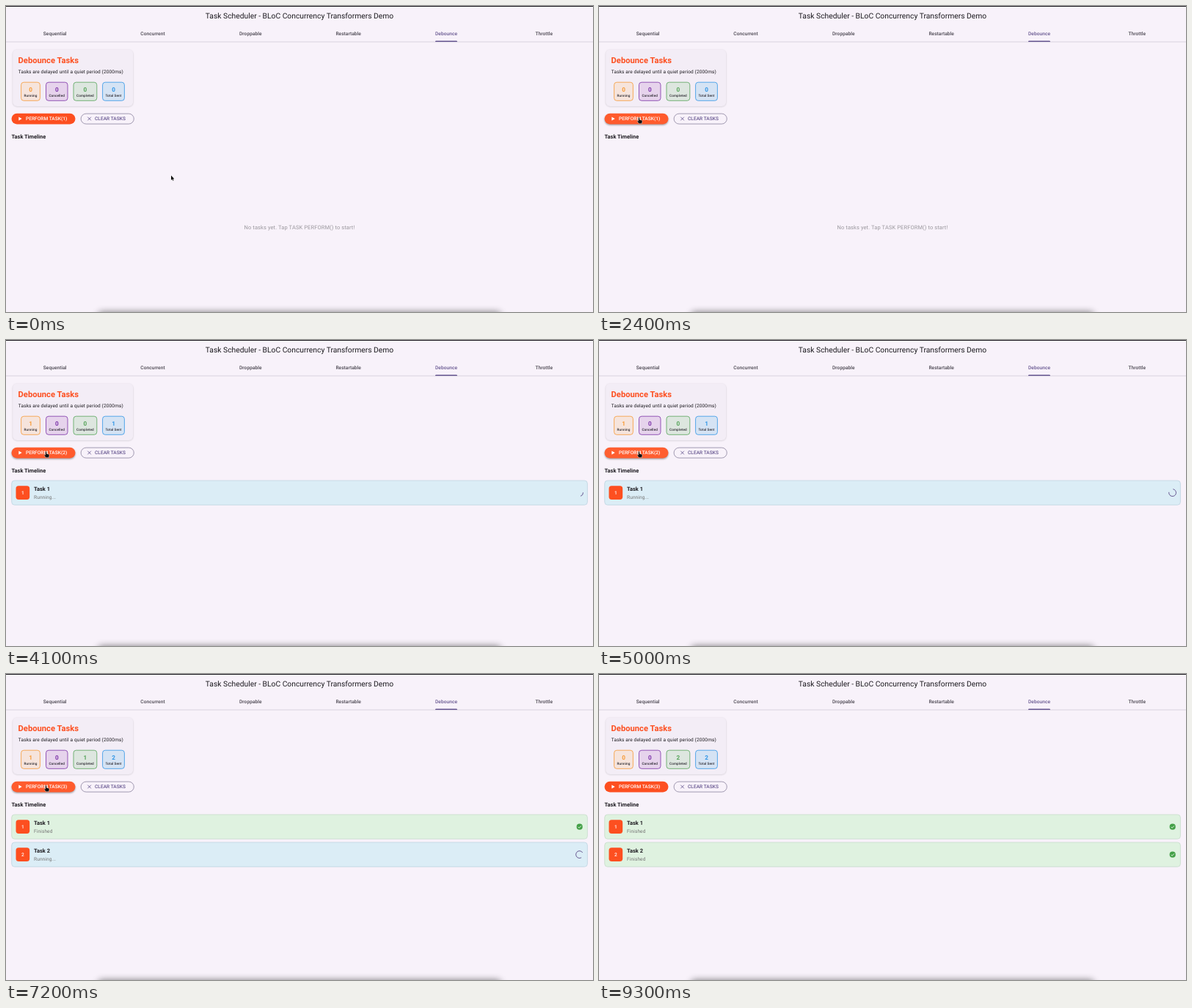
These frames come from a looping animation (800 by 418 pixels, 9400 ms). An HTML page:

```html
<!DOCTYPE html>
<html lang="en">
<head>
<meta charset="utf-8">
<title>Task Scheduler</title>
<style>
  html, body { margin: 0; width: 100%; height: 100%; overflow: hidden; background: #f8f2fa; }
  svg { display: block; font-family: Roboto, sans-serif; text-rendering: geometricPrecision; }
</style>
</head>
<body>
<svg id="stage" width="800" height="418" viewBox="0 0 800 418">
  <defs>
    <filter id="soft" x="-20%" y="-200%" width="140%" height="500%"><feGaussianBlur stdDeviation="1"/></filter>
    <filter id="dock" x="-20%" y="-200%" width="140%" height="500%"><feGaussianBlur stdDeviation="5"/></filter>
    <clipPath id="buttonClip"><rect x="7.5" y="146.8" width="87" height="14.6" rx="7.3"/></clipPath>
  </defs>
  <g id="fixed"></g>
  <g id="live"></g>
</svg>
<script>
const LOOP = 9400, STEP = 100;
const ORANGE = '#fd4f20', VIOLET = '#65558f', INK = '#1d1b20';
const TASKS = [
  { start: 3000, end: 5100, y: 192 },
  { start: 6550, end: 8600, y: 230 }
];
const CLICKS = [1000, 4550];
// time, x, y of the pointer tip
const POINTER = [
  [0, 225, 231.5], [100, 224, 228], [200, 221, 226], [700, 54.5, 152.3],
  [7900, 54.5, 152.3], [8400, 120, -12], [LOOP, 120, -12]
];

const clamp = v => Math.max(0, Math.min(1, v));
const smooth = v => v * v * (3 - 2 * v);

const text = (s, x, y, size, fill, { weight = 400, anchor = 'start', gap = 0 } = {}) =>
  `<text x="${x}" y="${y}" font-size="${size}" fill="${fill}" font-weight="${weight}" text-anchor="${anchor}" letter-spacing="${gap}">${s}</text>`;
const rect = (x, y, w, h, r, fill, extra = '') =>
  `<rect x="${x}" y="${y}" width="${w}" height="${h}" rx="${r}" fill="${fill}" ${extra}/>`;
const path = (d, extra) => `<path d="${d}" ${extra}/>`;

function fixedParts() {
  const tabs = ['Sequential', 'Concurrent', 'Droppable', 'Restartable', 'Debounce', 'Throttle'];
  return rect(0, 0, 800, 1, 0, '#1c1a20')
    + text('Task Scheduler - BLoC Concurrency Transformers Demo', 400, 17.4, 10.3, INK, { anchor: 'middle' })
    + tabs.map((name, i) => text(name, 66.67 + i * 133.33, 40.3, 6.6, i === 4 ? VIOLET : '#49454f',
        { weight: 500, anchor: 'middle', gap: .05 })).join('')
    + rect(0, 48.7, 800, .6, 0, '#c4bec9')
    + path('M585 49v-.2q0-1.2 1.2-1.2h27.6q1.2 0 1.2 1.2v.2z', `fill="${VIOLET}"`)
    + rect(9.2, 60, 164, 77.6, 6, '#000', 'opacity=".16" filter="url(#soft)"')
    + rect(9.2, 59.2, 164, 77.8, 6, '#f3edf6')
    + text('Debounce Tasks', 16.6, 78, 11.2, ORANGE, { weight: 700 })
    + text('Tasks are delayed until a quiet period (2000ms)', 16.8, 92.4, 6.55, INK, { gap: .117 })
    + rect(102.1, 147.1, 72.2, 14, 7, 'none', 'stroke="#7c7391" stroke-width=".7"')
    + path('M111.3 151.7l4.6 4.6m0-4.6l-4.6 4.6', `stroke="${VIOLET}" stroke-width=".85"`)
    + text('CLEAR TASKS', 121, 156.4, 6.55, VIOLET, { weight: 500, gap: .047 })
    + text('Task Timeline', 7.6, 180.7, 7.45, INK, { weight: 700 })
    + rect(125, 418, 550, 20, 6, '#000', 'opacity=".5" filter="url(#dock)"');
}

function stat(label, value, x, w, color, fill) {
  const mid = x + w / 2;
  return rect(x, 104.2, w, 25.1, 3.6, fill, `stroke="${color}" stroke-width=".8"`)
    + text(value, mid, 116.6, 8.2, color, { weight: 700, anchor: 'middle' })
    + text(label, mid, 124, 4.68, '#2b2830', { weight: 500, anchor: 'middle', gap: .1 });
}

function performButton(t, count, hover) {
  const ripples = CLICKS.filter(c => t >= c && t < c + 500).map(c => {
    const p = (t - c) / 500;
    return `<circle cx="55" cy="154" r="${8 + 45 * smooth(p)}" fill="#fff" opacity="${.14 * (1 - p)}"/>`;
  }).join('');
  return (hover ? rect(7.5, 148.2, 87, 14.6, 7.3, '#000', 'opacity=".35" filter="url(#soft)"') : '')
    + rect(7.5, 146.8, 87, 14.6, 7.3, hover ? '#ff5b2d' : ORANGE)
    + `<g clip-path="url(#buttonClip)">${ripples}</g>`
    + path('M17.3 151.4v5.2l4.4-2.6z', 'fill="#fff"')
    + text(`PERFORM TASK(${count})`, 27, 156.4, 6.55, '#fff', { weight: 500, gap: .047 });
}

// Material spinner: the head runs ahead, then the tail catches up
function spinner(age, cx, cy) {
  const r = 4.9, cycle = age / 1333 % 1;
  const sweep = 270 * Math.max(smooth(clamp(cycle * 2)) - smooth(clamp(cycle * 2 - 1)), .02);
  const tail = 270 * smooth(clamp(cycle * 2 - 1));
  const from = -90 + tail + age / 2222 * 360 + cycle * 90;
  const at = deg => {
    const a = deg * Math.PI / 180;
    return `${cx + r * Math.cos(a)} ${cy + r * Math.sin(a)}`;
  };
  return path(`M${at(from)}A${r} ${r} 0 ${sweep > 180 ? 1 : 0} 1 ${at(from + sweep)}`,
    `fill="none" stroke="${VIOLET}" stroke-width="1"`);
}

function taskCard({ start, end, y }, i, t) {
  const done = t >= end;
  const status = done
    ? `<circle cx="781.7" cy="${y + 16.7}" r="4.1" fill="#43a047"/>`
      + path(`M779.6 ${y + 16.8}l1.5 1.5 2.8-2.9`, 'fill="none" stroke="#fff" stroke-width=".85"')
    : spinner(t - start, 781.6, y + 16.6);
  return rect(7.7, y, 784.7, 33.3, 4, done ? '#dff2e0' : '#dbedf6',
      `stroke="${done ? '#c3d8c8' : '#b9d0de'}" stroke-width=".7"`)
    + rect(13.5, y + 7.3, 18.7, 18.7, 3.7, ORANGE)
    + text(i + 1, 22.8, y + 19.1, 6.55, '#fff', { weight: 500, anchor: 'middle' })
    + text(`Task ${i + 1}`, 38, y + 13.7, 7.45, INK, { weight: 700 })
    + text(done ? 'Finished' : 'Running...', 38, y + 25.4, 6.55, '#757575', { gap: .117 })
    + status;
}

function pointerAt(t) {
  const k = POINTER.findIndex((p, i) => i > 0 && t <= p[0]);
  const [t0, x0, y0] = POINTER[k - 1], [t1, x1, y1] = POINTER[k];
  const p = smooth((t - t0) / (t1 - t0));
  return { x: x0 + (x1 - x0) * p, y: y0 + (y1 - y0) * p };
}

function pointer({ x, y }, hand) {
  const shape = hand
    ? 'M-.7 .5Q0-.5 .7 .5V3.2L3.6 3.9Q4.4 4.2 4.3 5L3.8 8.2H-.2L-2.3 5.2Q-1.9 4.3-.7 5.2Z'
    : 'M0 0V6.4L1.5 5.1 2.5 7.3 3.5 6.8 2.5 4.7H4.4Z';
  return path(shape, `transform="translate(${x} ${y})" fill="#111" stroke="#fff" stroke-width=".8" paint-order="stroke"`);
}

function liveParts(t) {
  const shown = TASKS.filter(task => t >= task.start);
  const completed = shown.filter(task => t >= task.end).length;
  // a click only shows up with the next state change
  const sent = t >= TASKS[0].end ? 2 : shown.length;
  const tip = pointerAt(t);
  const hover = tip.x > 7 && tip.x < 95 && tip.y > 146 && tip.y < 162;
  return stat('Running', shown.length - completed, 20.6, 25.8, '#f79a35', '#f6e4dc')
    + stat('Cancelled', 0, 54.5, 29.5, '#7b32a8', '#e6d3ec')
    + stat('Completed', completed, 92, 31.8, '#56a45a', '#dde6df')
    + stat('Total Sent', sent, 131.6, 29.8, '#3296e6', '#d5e3f4')
    + performButton(t, sent + 1, hover)
    + (shown.length ? '' : text('No tasks yet. Tap TASK PERFORM() to start!', 400, 305, 7.49, '#9b989e',
        { anchor: 'middle', gap: .117 }))
    + shown.map((task, i) => taskCard(task, i, t)).join('')
    + pointer(tip, hover);
}

const live = document.getElementById('live');
document.getElementById('fixed').innerHTML = fixedParts();
let last = -1;
function tick() {
  const t = Math.floor(performance.now() % LOOP / STEP) * STEP;
  if (t !== last) live.innerHTML = liveParts(last = t);
  requestAnimationFrame(tick);
}
tick();
</script>
</body>
</html>
```
